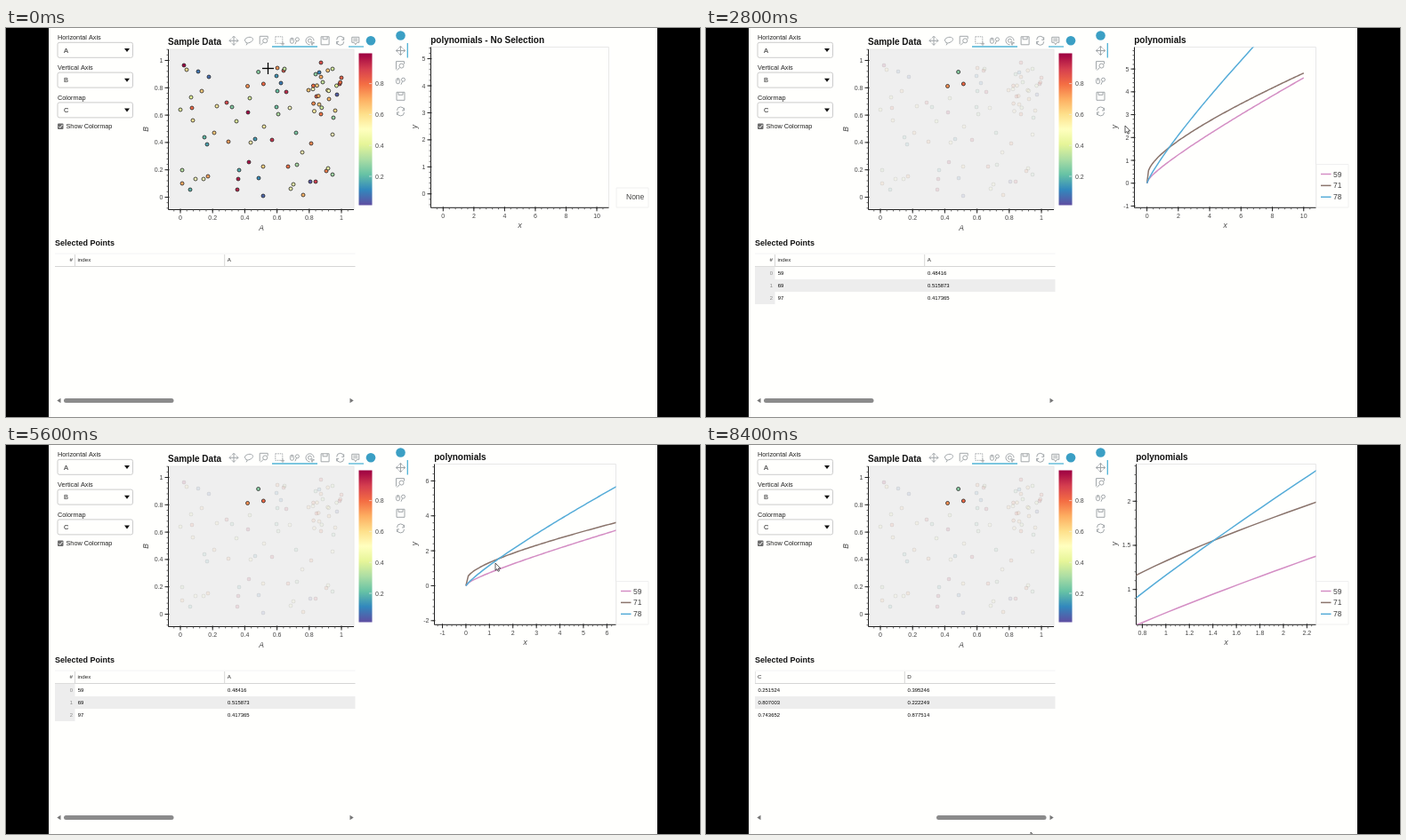
An HTML page with a canvas for the animation above (8.48 s loop, 780 px wide and 438 px high).

```html
<!DOCTYPE html>
<html lang="en">
<head>
<meta charset="utf-8">
<title>Linked selection dashboard</title>
<style>
  html, body { margin: 0; width: 100%; height: 100%; overflow: hidden; background: #000; }
  canvas { display: block; width: 780px; height: 438px; }
</style>
</head>
<body>
<canvas id="stage"></canvas>
<script>
const LOOP = 8480, STEP = 80, SELECT_AT = 1440;
const DRAG = [400, 1360], SCROLL = [7280, 8080];
const SANS = '"Liberation Sans", Arial, sans-serif';
const PAGE = '#fffffd', GREY = '#a1a6a9', TEAL = '#4fb3d6', EDGE = '#e8e8e8';

const canvas = document.getElementById('stage');
const dpr = window.devicePixelRatio || 1;
canvas.width = 780 * dpr;
canvas.height = 438 * dpr;
const g = canvas.getContext('2d');

const clamp = (v, lo, hi) => Math.min(hi, Math.max(lo, v));
const part = (t, [a, b]) => clamp((t - a) / (b - a), 0, 1);
const mix = (a, b, k) => a + (b - a) * k;

// ---- drawing helpers ----
function rect(x, y, w, h, fill, stroke, radius = 0) {
  g.beginPath();
  g.roundRect(x, y, w, h, radius);
  if (fill) { g.fillStyle = fill; g.fill(); }
  if (stroke) { g.strokeStyle = stroke; g.lineWidth = 1; g.stroke(); }
}
function text(s, x, y, size, { align = 'left', style = '', color = '#222' } = {}) {
  g.font = `${style} ${size}px ${SANS}`;
  g.textAlign = align;
  g.fillStyle = color;
  g.fillText(s, x, y);
}
function line(x1, y1, x2, y2, color = '#222', width = 1) {
  g.strokeStyle = color;
  g.lineWidth = width;
  g.beginPath();
  g.moveTo(x1, y1);
  g.lineTo(x2, y2);
  g.stroke();
}
function disc(x, y, r, fill, stroke) {
  g.beginPath();
  g.arc(x, y, r, 0, 7);
  g.fillStyle = fill;
  g.fill();
  if (stroke) { g.strokeStyle = stroke; g.lineWidth = 0.8; g.stroke(); }
}
function shape(d, x, y, { fill, stroke, width = 1, dash = [] }) {
  const path = new Path2D(d);
  g.save();
  g.translate(x, y);
  if (fill) { g.fillStyle = fill; g.fill(path); }
  if (stroke) { g.strokeStyle = stroke; g.lineWidth = width; g.setLineDash(dash); g.stroke(path); }
  g.restore();
}

// ---- colours and data ----
const SPECTRAL = ['#5e4fa2', '#3288bd', '#66c2a5', '#abdda4', '#e6f598', '#ffffbf',
  '#fee08b', '#fdae61', '#f46d43', '#d53e4f', '#9e0142'];
function spectral(v) {
  const p = clamp(v, 0, 1) * 10, i = Math.min(9, Math.floor(p));
  const channel = (hex, n) => parseInt(hex.slice(n, n + 2), 16);
  return 'rgb(' + [1, 3, 5].map(n =>
    Math.round(mix(channel(SPECTRAL[i], n), channel(SPECTRAL[i + 1], n), p - i))) + ')';
}

const ROWS = [
  { index: 59, A: 0.48416, B: 0.915619, C: 0.251524, D: 0.395246, label: 59, color: '#d48ec4' },
  { index: 69, A: 0.515873, B: 0.828204, C: 0.807003, D: 0.222249, label: 71, color: '#8a746c' },
  { index: 97, A: 0.417365, B: 0.811943, C: 0.743652, D: 0.877514, label: 78, color: '#55acd8' },
];
const poly = (r, x) => r.A * x ** r.B + r.C * x ** r.D;

// Dot positions, ordered from the highest colour value to the lowest.
const RANKED = [
  200,42, 272,95, 273,151, 261,170, 260,182, 315,72, 299,126, 348,173, 375,63, 248,84,
  354,39, 312,48, 349,77, 377,56, 209,90, 317,156, 354,97, 360,161, 343,130, 305,45,
  250,128, 227,167, 198,175, 334,188, 363,80, 340,70, 234,118, 220,71, 289,156, 370,93,
  203,47, 210,104, 237,88, 290,111, 275,129, 333,140, 367,120, 319,90, 213,170, 222,170,
  320,181, 323,176, 362,158, 196,92, 208,78, 259,105, 274,79, 367,46, 356,61, 313,46,
  198,160, 306,97, 327,154, 367,165, 368,101, 348,52, 254,89, 326,118, 304,89, 305,71,
  223,123, 207,182, 262,160, 226,131, 280,125, 304,54, 284,169, 352,50, 309,62, 216,49,
  228,55, 289,189, 372,75, 342,173];
const dots = [];
for (let i = 0; i < RANKED.length; i += 2)
  dots.push({ x: RANKED[i], y: RANKED[i + 1], color: spectral(1 - i / RANKED.length) });
// The rest are scattered over the crowded right side.
let seed = 11;
const random = () => (seed = seed * 16807 % 2147483647) / 2147483647;
for (let i = 0; i < 14; i++)
  dots.push({ x: 345 + 32 * random(), y: 42 + 60 * random(), color: spectral(0.35 + 0.5 * random()) });
const chosen = ROWS.map(r => ({ x: 196 + 181 * r.A, y: 190.5 - 154 * r.B, color: spectral(r.C) }));

// ---- axes ----
function interval(span) {
  const base = 10 ** Math.floor(Math.log10(span / 6));
  const error = s => Math.abs(6 - span / s);
  return [1, 2, 5, 10].map(m => m * base).reduce((a, b) => error(b) < error(a) ? b : a);
}
function ticks([lo, hi], step) {
  const out = [];
  for (let i = Math.ceil(lo / step); i <= hi / step; i++) out.push(+(i * step).toFixed(4) || 0);
  return out;
}
function axes(box, xr, yr, labelY) {
  const { l, r, t, b } = box;
  const px = v => l + (v - xr[0]) / (xr[1] - xr[0]) * (r - l);
  const py = v => b - (v - yr[0]) / (yr[1] - yr[0]) * (b - t);
  line(l, t, l, b);
  line(l, b, r, b);
  const sx = interval(xr[1] - xr[0]), sy = interval(yr[1] - yr[0]);
  for (const v of ticks(xr, sx / 5)) line(px(v), b, px(v), b + 2, '#444', 0.8);
  for (const v of ticks(yr, sy / 5)) line(l, py(v), l - 2, py(v), '#444', 0.8);
  for (const v of ticks(xr, sx)) {
    line(px(v), b - 1, px(v), b + 4);
    text(v, px(v), labelY, 7, { align: 'center', color: '#444' });
  }
  for (const v of ticks(yr, sy)) {
    line(l + 1, py(v), l - 4, py(v));
    text(v, l - 6, py(v) + 2.5, 7, { align: 'right', color: '#444' });
  }
  return { px, py };
}
function axisNames(x, xx, xy, y, yx, yy) {
  const look = { align: 'center', style: 'italic', color: '#444' };
  text(x, xx, xy, 8.5, look);
  g.save();
  g.translate(yx, yy);
  g.rotate(-Math.PI / 2);
  text(y, 0, 0, 8.5, look);
  g.restore();
}

// ---- toolbars ----
const ICONS = {
  pan: 'M-5 0H5M0-5V5M-3-2L-5 0l2 2M3-2L5 0 3 2M-2-3L0-5 2-3M-2 3L0 5 2 3',
  lasso: 'M-3 2C-7-1-3-4 1-4S6 0 1 2-3 1-3 2q2 1 0 3',
  boxZoom: 'M-5 4V-5H4V-2M3.5 0a2.5 2.5 0 1 0-5 0 2.5 2.5 0 1 0 5 0M-1 2l-3 3',
  boxSelect: 'M-4.5-4.5H3.5V3H-4.5Z',
  plus: 'M2 3.5H6M4 1.5V5.5',
  wheel: 'M-1-1a2 2 0 1 0-4 0V1a2 2 0 1 0 4 0ZM5-1.5a2 2 0 1 0-4 0 2 2 0 1 0 4 0M2 .5L.5 4M-3-3V0',
  tap: 'M4.5 0a4.5 4.5 0 1 0-4.5 4.5M2 0a2 2 0 1 0-2 2M1 1l4 1.5-2 .5-.5 2Z',
  save: 'M-4.5-4.5H4.5V4.5H-4.5ZM-2.5-4.5V-1.5H2.5V-4.5',
  reset: 'M-4-1A4 4 0 0 1 4-1M4 1A4 4 0 0 1-4 1M4-4V-1H1.5M-4 4V1H-1.5',
  hover: 'M-4-4H4V2H1.5L0 4.5-1.5 2H-4ZM-2.5-2H2.5M-2.5 0H2.5',
};
const icon = (name, x, y) =>
  shape(ICONS[name], x, y, { stroke: GREY, dash: name === 'boxSelect' ? [1.5, 1] : [] });

function toolbars() {
  ['pan', 'lasso', 'boxZoom', 'boxSelect', 'wheel', 'tap', 'save', 'reset', 'hover']
    .forEach((name, i) => icon(name, 256 + 17.1 * i, 14.3));
  icon('plus', 307, 14.3);
  line(299, 21, 350, 21, TEAL, 1.3);
  line(385, 21, 402, 21, TEAL, 1.3);
  disc(410, 14.3, 5.3, '#3b9fc4');
  disc(443.5, 8.5, 5.3, '#3b9fc4');
  ['pan', 'boxZoom', 'wheel', 'save', 'reset'].forEach((name, i) => icon(name, 443.5, 25.5 + 17.1 * i));
  line(451.3, 17, 451.3, 33.5, TEAL, 1.3);
}

// ---- panels ----
function controls() {
  [['Horizontal Axis', 'A'], ['Vertical Axis', 'B'], ['Colormap', 'C']].forEach(([name, value], i) => {
    const y = 33.8 * i;
    text(name, 58, 13.3 + y, 7.3);
    rect(58, 16.3 + y, 84.5, 17, PAGE, '#ccc', 2);
    text(value, 65, 27.5 + y, 7.5);
    shape('M-3-1.8H3L0 2.2Z', 136, 24.8 + y, { fill: '#111' });
  });
  rect(58, 107.5, 6.5, 6.5, '#6b6b6b', null, 1);
  shape('M-2 0L-.5 1.6 2.2-1.8', 61.2, 110.8, { stroke: '#fff' });
  text('Show Colormap', 67.5, 113.3, 7.3);
}

function scatter(t) {
  const box = { l: 182.5, r: 391, t: 24, b: 204.5 };
  text('Sample Data', 182, 19, 10, { style: 'bold', color: '#111' });
  rect(box.l, box.t, box.r - box.l, box.b - box.t, '#efefef', EDGE);
  axes(box, [-0.0746, 1.0773], [-0.0909, 1.0812], 215.8);
  axisNames('A', 287, 227.8, 'B', 160, 114);

  const selected = t >= SELECT_AT;
  g.globalAlpha = selected ? 0.1 : 1;
  for (const d of dots) disc(d.x, d.y, 2, d.color, '#222');
  g.globalAlpha = 1;
  for (const d of chosen) disc(d.x, d.y, 2, d.color, '#222');

  const bar = g.createLinearGradient(0, 199, 0, 29);
  SPECTRAL.forEach((c, i) => bar.addColorStop(i / 10, c));
  rect(396.5, 28.5, 15, 171, bar);
  [0.2, 0.4, 0.6, 0.8].forEach((v, i) => {
    line(408, 167 - 34.8 * i, 411, 167 - 34.8 * i, '#eee', 0.7);
    text(v, 415, 169.5 - 34.8 * i, 7, { color: '#444' });
  });

  if (t > DRAG[0] && t < SELECT_AT) {
    const [x, y] = pointer(t);
    g.save();
    g.globalAlpha = 0.5;
    rect(x, 45.5, 294.5 - x, y - 45.5, '#d3d3d3');
    g.globalAlpha = 1;
    g.setLineDash([3, 3]);
    rect(x, 45.5, 294.5 - x, y - 45.5, null, '#000');
    g.restore();
  }
}

// Visible ranges follow from wheel steps and one drag.
function view(t) {
  let x = [-0.8, 10.78], y = [-0.51, 5.43];
  const zoom = (range, centre, f) => range.map(v => centre + (v - centre) * f);
  const wheel = (start, gap, max) => clamp(Math.floor((t - start) / gap) + 1, 0, max);
  const zoomIn = (cx, cy, n) => {
    x = zoom(x, cx, 0.8167 ** n);
    y = zoom(y, cy, 0.8167 ** n);
  };
  y = zoom(y, 2.55, 1.1833 ** wheel(2800, 200, 5));
  zoomIn(4.62, 3.7, wheel(4640, 80, 1));
  const pan = 2.12 * part(t, [5200, 5520]);
  x = x.map(v => v - pan);
  zoomIn(1.27, 1.367, wheel(5600, 80, 5));
  zoomIn(1.26, 1.27, wheel(6160, 80, 4));
  return { x, y };
}

function polynomials(t) {
  const selected = t >= SELECT_AT;
  const { x, y } = view(t);
  const labels = ticks(y, interval(y[1] - y[0])).join(' ');
  const left = labels.includes('.') ? 483.5 : labels.includes('-') ? 481.5 : 477.5;
  const box = { l: left, r: selected ? 685.5 : 677.5, t: 21.5, b: 202.3 };
  text('polynomials' + (selected ? '' : ' - No Selection'), left - 0.3, 16.6, 10, { style: 'bold', color: '#111' });
  rect(box.l, box.t, box.r - box.l, box.b - box.t, PAGE, EDGE);
  const { px, py } = axes(box, x, y, 213.8);
  axisNames('x', (box.l + box.r) / 2, 225, 'y', 462, 111);

  const top = selected ? 153.5 : 180;
  rect(686, top, 36, 202 - top, PAGE, '#f0f0f0');
  if (!selected) {
    text('None', 697, 192.8, 8.5, { color: '#444' });
    return;
  }
  g.save();
  g.beginPath();
  g.rect(box.l, box.t, box.r - box.l, box.b - box.t);
  g.clip();
  g.lineWidth = 1.5;
  g.lineJoin = 'round';
  for (const r of ROWS) {
    g.strokeStyle = r.color;
    g.beginPath();
    for (let i = 0; i < 100; i++) {
      const v = i * 10 / 99;
      g.lineTo(px(v), py(poly(r, v)));
    }
    g.stroke();
  }
  g.restore();
  ROWS.forEach((r, i) => {
    const ly = 164.5 + 12.9 * i;
    line(691, ly, 702.5, ly, r.color, 1.5);
    text(r.label, 705, ly + 3, 8.5, { color: '#444' });
  });
}

function table(t) {
  const scroll = part(t, SCROLL), shift = 527 * scroll;
  text('Selected Points', 55, 245.3, 9, { style: 'bold', color: '#111' });
  g.save();
  g.beginPath();
  g.rect(55, 252, 337.5, 150);
  g.clip();
  line(55, 254, 393, 254, '#f2f2f2', 0.8);
  line(55, 268.5, 393, 268.5, '#ccc', 0.8);
  const columns = ['index', 'A', 'B', 'C', 'D'];
  const colX = i => 78 + 168.2 * i - shift;
  text('#', 75 - shift, 263.3, 6.2, { align: 'right' });
  columns.forEach((name, i) => {
    line(colX(i) - 0.5, 255, colX(i) - 0.5, 268, '#ccc', 0.8);
    text(name, colX(i) + 2.5, 263.3, 6.2);
  });
  if (t >= SELECT_AT) {
    rect(55, 283, 338, 14, '#ededed');
    rect(55 - shift, 268.8, 22.5, 42.2, '#ededed');
    ROWS.forEach((r, i) => {
      const y = 277.6 + 14.2 * i;
      text(i, 75 - shift, y, 5.9, { align: 'right', color: '#888' });
      columns.forEach((name, k) => text(r[name], colX(k) + 2.8, y, 5.9, { color: '#000' }));
    });
  }
  g.restore();
  rect(65 + 194 * scroll, 417, 123.5, 5, '#8b8b8b', null, 2.5);
  shape('M2-2.7V2.7L-2.2 0Z', 59.5, 419.5, { fill: '#777' });
  shape('M-2-2.7V2.7L2.2 0Z', 388.5, 419.5, { fill: '#777' });
}

// ---- pointer ----
const PATH = [
  [0, 294.5, 45.5], [DRAG[0], 294.5, 45.5], [DRAG[1], 266.5, 72], [1840, 266.5, 72],
  [2640, 471, 110], [3840, 471, 110], [4400, 577, 94], [4720, 577, 94], [5040, 535, 134],
  [5200, 505, 132], [5520, 550, 133], [6000, 550, 133], [6120, 548, 135], [6480, 548, 135],
  [7040, 235, 352], [7200, 168, 415], [SCROLL[0], 168, 415], [SCROLL[1], 362, 415],
  [8400, 365, 436], [LOOP, 365, 437],
];
function pointer(t) {
  const i = PATH.findIndex(p => p[0] > t), a = PATH[i - 1], b = PATH[i];
  const k = (t - a[0]) / (b[0] - a[0]), ease = k * k * (3 - 2 * k);
  const along = a[0] === SCROLL[0] ? k : ease;
  return [mix(a[1], b[1], along), mix(a[2], b[2], along)];
}
function drawPointer(t) {
  const [x, y] = pointer(t);
  if (x > 182 && x < 391 && y > 24 && y < 204) {
    line(x - 6.5, y, x + 6.5, y, '#000', 1.3);
    line(x, y - 6.5, x, y + 6.5, '#000', 1.3);
  } else {
    shape('M0 0V8.2L1.9 6.5 3.1 9.3 4.5 8.7 3.3 6H5.8Z', x, y, { fill: '#fff', stroke: '#333', width: 0.8 });
  }
}

function draw(now) {
  const t = Math.floor(now % LOOP / STEP) * STEP;
  g.setTransform(dpr, 0, 0, dpr, 0, 0);
  rect(0, 0, 780, 438, '#000');
  rect(48, 0, 684, 438, PAGE);
  controls();
  scatter(t);
  polynomials(t);
  toolbars();
  table(t);
  drawPointer(t);
}
const start = performance.now();
function frame() {
  draw(performance.now() - start);
  requestAnimationFrame(frame);
}
frame();
</script>
</body>
</html>
```
